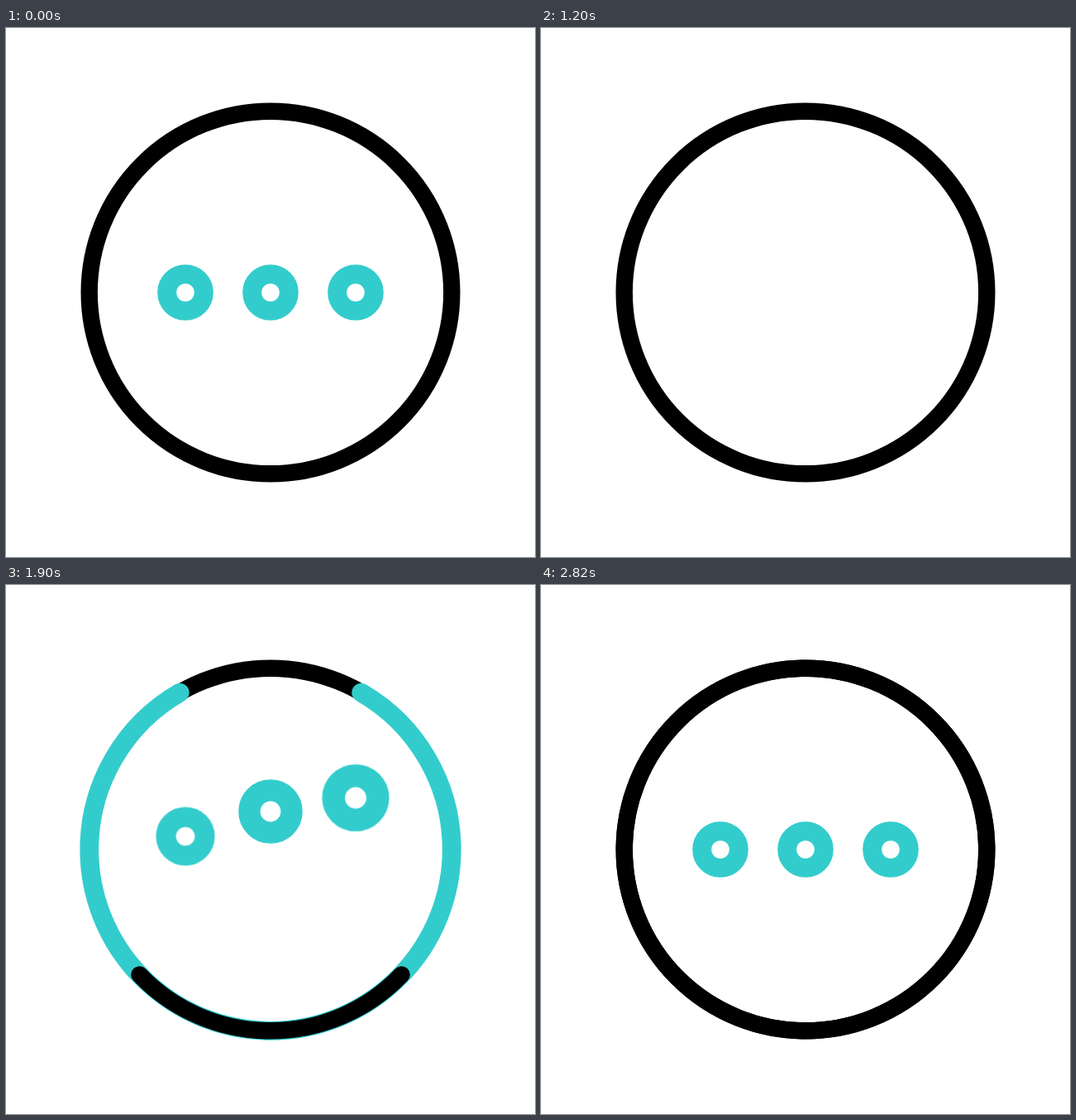
An HTML page for the animation above (3.6 s loop, 640 by 640 pixels).

```html
<!DOCTYPE html>
<html lang="en">
<head>
<meta charset="utf-8">
<title>More</title>
<style>
  :root {
    --ink: #000;
    --accent: #33cccc;
    --loop: 3600ms;
    --smooth: cubic-bezier(.333, 0, .667, 1);
  }
  html, body { margin: 0; width: 100%; height: 100%; overflow: hidden; background: #fff; }
  svg { display: block; width: 100%; height: 100%; }

  .ring, .arc, .dot { fill: none; }
  .ring { stroke: var(--ink); stroke-width: 20.4; }

  /* Both halves grow from the bottom to the top. */
  .arc {
    stroke-linecap: round;
    stroke-dasharray: 1 2;
    animation:
      sweep var(--loop) linear var(--delay) infinite backwards,
      show var(--loop) step-end var(--delay) infinite backwards;
  }
  .lead  { --delay: 0ms; stroke: var(--accent); stroke-width: 22.8; }
  .trail { --delay: 400ms; stroke: var(--ink); stroke-width: 20.4; }

  .dot { stroke: var(--accent); stroke-width: 23; }
  .rise { animation: rise var(--loop) var(--smooth) var(--in) infinite backwards; }
  .pop  { animation: pop var(--loop) var(--smooth) var(--out) infinite backwards; }
  .left   { --in: 0ms;   --out: 200ms; }
  .middle { --in: 100ms; --out: 92ms; }
  .right  { --in: 200ms; --out: 0ms; }

  @keyframes sweep {
    0% { stroke-dashoffset: 1; }
    33.333% { stroke-dashoffset: 1; animation-timing-function: cubic-bezier(.333, 0, .3, 1); }
    66.667%, 100% { stroke-dashoffset: 0; }
  }
  @keyframes show {
    0% { opacity: 0; }
    33.5% { opacity: 1; }
    78%, 100% { opacity: 0; }
  }
  /* Swell, then shrink away; reset while out of sight. */
  @keyframes pop {
    0% { transform: scale(1); }
    4.028% { transform: scale(1.2); }
    16.528% { transform: scale(0); animation-timing-function: step-end; }
    29.167%, 100% { transform: scale(1); }
  }
  /* Wait below the ring, jump up, settle. */
  @keyframes rise {
    0% { transform: translateY(0) scale(1); animation-timing-function: step-end; }
    22.222%, 33.333% { transform: translateY(258px) scale(.2); }
    47.222% { transform: translateY(-62.5px) scale(1.2); }
    55.556%, 100% { transform: translateY(0) scale(1); }
  }
</style>
</head>
<body>
<svg viewBox="0 0 640 640">
  <defs>
    <clipPath id="inside"><circle cx="320" cy="320" r="219"/></clipPath>
    <circle id="dot" class="dot" r="22.3"/>
    <path id="halves" pathLength="2"
      d="M320 539.3A219.3 219.3 0 0 0 320 100.7M320 539.3A219.3 219.3 0 0 1 320 100.7"/>
  </defs>
  <g clip-path="url(#inside)">
    <g class="left" transform="translate(217 320)"><g class="rise"><g class="pop"><use href="#dot"/></g></g></g>
    <g class="middle" transform="translate(320 320)"><g class="rise"><g class="pop"><use href="#dot"/></g></g></g>
    <g class="right" transform="translate(423 320)"><g class="rise"><g class="pop"><use href="#dot"/></g></g></g>
  </g>
  <circle class="ring" cx="320" cy="320" r="219.3"/>
  <use href="#halves" class="arc lead"/>
  <use href="#halves" class="arc trail"/>
</svg>
</body>
</html>
```
